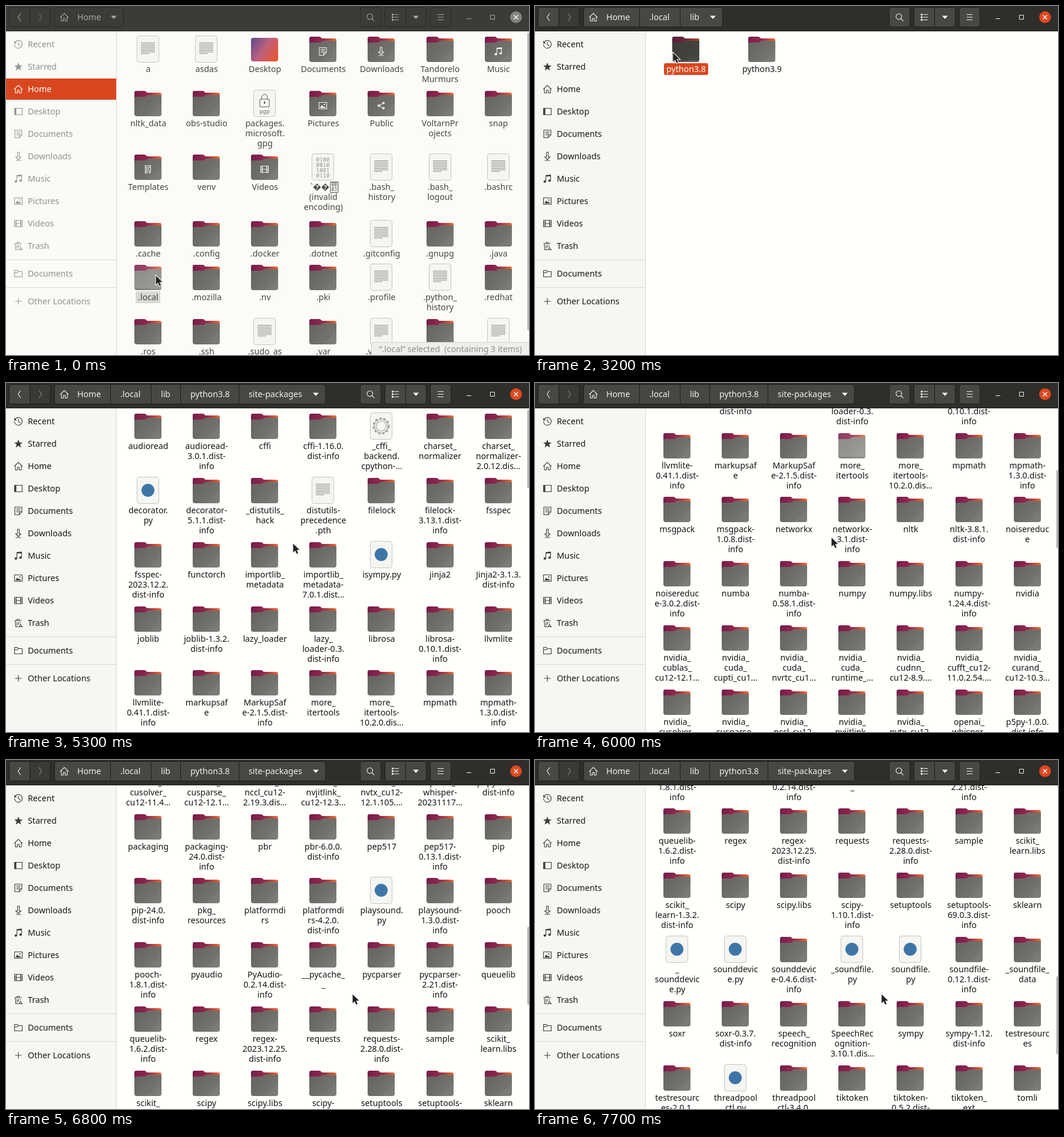
Recreate the animation shown at these times as an HTML page with a canvas. Size 888x592 px, loop 8 s.

```html
<!DOCTYPE html>
<html lang="en">
<head>
<meta charset="utf-8">
<title>File manager</title>
<style>
html, body { margin: 0; width: 888px; height: 592px; overflow: hidden; }
canvas { display: block; }
</style>
</head>
<body>
<canvas id="stage" width="888" height="592"></canvas>
<script>
const ctx = document.getElementById('stage').getContext('2d');
const LOOP = 8000, TICK = 100, NOTCH = 67.13;
const ORANGE = '#d9471f';
const FONT = '14.2px "Noto Sans", "Open Sans", sans-serif';

// 16px symbolic icons: [stroked path, filled path]
const ICONS = {
  Recent: ['M2.6 4.2A6.6 6.6 0 1 1 1.4 8M8 4v4.5l3.4 2', 'M1 2v4.5h4.5z'],
  Starred: ['', 'M8 1l2 5h5.2l-4.2 3.3 1.5 5.2L8 11.4 3.5 14.5 5 9.3.8 6H6z'],
  Home: ['M.8 8.6L8 1.5l7.2 7.1M3 7v7.5h3.5V10h3v4.5H13V7', ''],
  Desktop: ['M1.5 2.5h13v11h-13z', 'M1.5 2.5h3v11h-3z'],
  Documents: ['M2 1.5h12v8l-4.5 5H2zM4.5 4.5h7M4.5 7h7M4.5 9.5h4M9.5 14.5v-5H14', ''],
  Downloads: ['M6.5 1v8h-3L8 13.5 12.5 9h-3V1zM3.5 15h9', ''],
  Music: ['M5.5 12.5V2.5l8-1v9.5', 'M5 2h9v2H5zM1.5 12.8a2.2 2 0 1 1 4.4 0a2.2 2 0 1 1-4.4 0M9.5 11.3a2.2 2 0 1 1 4.4 0a2.2 2 0 1 1-4.4 0'],
  Pictures: ['M1.5 2.5h13v11h-13z', 'M3 12l3-5 2.5 3 1.5-1 3 3zM9.5 5h2v2h-2z'],
  Videos: ['M1.5 2.5h13v11h-13zM4.5 2.5v11M11.5 2.5v11M4.5 8h7M1.5 5.5h3M1.5 8h3M1.5 10.5h3M11.5 5.5h3M11.5 8h3M11.5 10.5h3', ''],
  Trash: ['M1.5 4h12M5.5 4V2h4v2M2.8 4l.8 10.5h5M6 6.5v6M8.5 6.5v4M11.5 6.5v2M9.5 14.5l2-4 3 4z', ''],
  Folder: ['M1.5 13.5v-11h5l1.5 2h6.5v9zM1.5 6.5h5l1.5-2', ''],
  Plus: ['M8 2.5v11M2.5 8h11', ''],
  Public: ['M12 3.5L4 8l8 4.5', 'M10 3.5a2 2 0 1 1 4 0a2 2 0 1 1-4 0M2 8a2 2 0 1 1 4 0a2 2 0 1 1-4 0M10 12.5a2 2 0 1 1 4 0a2 2 0 1 1-4 0'],
  Templates: ['M3.5 1.5h3v13h-3zM3.5 5h2M3.5 8h2M3.5 11h2M9.5 1.5h3v10l-1.5 3-1.5-3zM9.5 4.5h3', ''],
  Search: ['M2 7a4.8 4.8 0 1 1 9.6 0a4.8 4.8 0 1 1-9.6 0M10.3 10.5l4.2 4.2', ''],
  List: ['M6 3.5h8M6 8h8M6 12.5h8', 'M2 2h3v3H2zM2 6.5h3v3H2zM2 11h3v3H2z'],
  Menu: ['M3 3.5h10M3 8h10M3 12.5h10', ''],
  Back: ['M10 1.5L5.5 8l4.5 6.5', ''],
  Forward: ['M6 1.5L10.5 8L6 14.5', ''],
  Down: ['', 'M3 5.5h10L8 11z']
};
for (const key in ICONS) ICONS[key] = ICONS[key].map(d => new Path2D(d));

const SIDEBAR = 'Recent Starred Home Desktop Documents Downloads Music Pictures Videos Trash'.split(' ')
  .map((name, i) => [name, name, 65 + 38 * i])
  .concat([['Folder', 'Documents', 454], ['Plus', 'Other Locations', 501]]);

// Items are split by spaces, label lines by "/".
// Leading sign: = text, # script, * library, @ key, % binary.
const list = text => text.trim().split(/\s+/).map(item => {
  const kind = '=#*@%'.includes(item[0]) ? item[0] : '';
  return { kind, lines: item.slice(kind.length).split('/') };
});

const HOME = list(`
=a =asdas Desktop Documents Downloads Tandorelo/Murmurs Music
nltk_data obs-studio @packages./microsoft./gpg Pictures Public VoltarnPr/ojects snap
Templates venv Videos %\`\uFFFD\uFFFD/(invalid/encoding) =.bash_/history =.bash_/logout =.bashrc
.cache .config .docker .dotnet =.gitconfig .gnupg .java
.local .mozilla .nv .pki =.profile =.python_/history .redhat
.ros .ssh =.sudo_as .var =.viminfo .vscode =.wget-hsts`);

const PACKAGES = list(`
audioread audioread-/3.0.1.dist-/info cffi cffi-1.16.0./dist-info *_cffi_/backend./cpython-… charset_/normalizer charset_/normalizer-/2.0.12.dis…
#decorator./py decorator-/5.1.1.dist-/info _distutils_/hack =distutils-/precedence/.pth filelock filelock-/3.13.1.dist-/info fsspec
fsspec-/2023.12.2./dist-info functorch importlib_/metadata importlib_/metadata-/7.0.1.dist… #isympy.py jinja2 Jinja2-3.1.3./dist-info
joblib joblib-1.3.2./dist-info lazy_loader lazy_/loader-0.3./dist-info librosa librosa-/0.10.1.dist-/info llvmlite
llvmlite-/0.41.1.dist-/info markupsaf/e MarkupSaf/e-2.1.5.dist-/info more_/itertools more_/itertools-/10.2.0.dis… mpmath mpmath-/1.3.0.dist-/info
msgpack msgpack-/1.0.8.dist-/info networkx networkx-/3.1.dist-/info nltk nltk-3.8.1./dist-info noisereduc/e
noisereduc/e-3.0.2.dist-/info numba numba-/0.58.1.dist-/info numpy numpy.libs numpy-/1.24.4.dist-/info nvidia
nvidia_/cublas_/cu12-12.1… nvidia_/cuda_/cupti_cu1… nvidia_/cuda_/nvrtc_cu1… nvidia_/cuda_/runtime_… nvidia_/cudnn_/cu12-8.9.… nvidia_/cufft_cu12-/11.0.2.54.… nvidia_/curand_/cu12-10.3…
nvidia_/cusolver_/cu12-11.4… nvidia_/cusparse_/cu12-12.1… nvidia_/nccl_cu12-/2.19.3.dis… nvidia_/nvjitlink_/cu12-12.3… nvidia_/nvtx_cu12-/12.1.105.… openai_/whisper-/20231117… p5py-1.0.0./dist-info
packaging packaging-/24.0.dist-/info pbr pbr-6.0.0./dist-info pep517 pep517-/0.13.1.dist-/info pip
pip-24.0./dist-info pkg_/resources platformdi/rs platformdi/rs-4.2.0./dist-info #playsound./py playsound-/1.3.0.dist-/info pooch
pooch-/1.8.1.dist-/info pyaudio PyAudio-/0.2.14.dist-/info __pycache_/_ pycparser pycparser-/2.21.dist-/info queuelib
queuelib-/1.6.2.dist-/info regex regex-/2023.12.25./dist-info requests requests-/2.28.0.dist-/info sample scikit_/learn.libs
scikit_/learn-1.3.2./dist-info scipy scipy.libs scipy-/1.10.1.dist-/info setuptools setuptools-/69.0.3.dist-/info sklearn
#_/sounddevic/e.py #sounddevic/e.py sounddevic/e-0.4.6.dist-/info #_soundfile./py #soundfile./py soundfile-/0.12.1.dist-/info _soundfile_/data
soxr soxr-0.3.7./dist-info speech_/recognition SpeechRec/ognition-/3.10.1.dis… sympy sympy-1.12./dist-info testresourc/es
testresourc/es-2.0.1./dist-info #threadpool/ctl.py threadpool/ctl-3.4.0./dist-info tiktoken tiktoken-/0.5.2.dist-/info tiktoken_/ext tomli`);

const HOME_ROWS = [52, 144, 252, 365, 439, 531];
const flatRow = () => 52;
const VIEWS = [
  { start: 0, items: HOME, x: 241, gap: 99.1, rowY: r => HOME_ROWS[r], bar: 504 },
  { start: 800, items: list('bin lib share'), x: 249, gap: 117, rowY: flatRow },
  { start: 2100, items: list('python3.8 python3.9'), x: 256, gap: 129, rowY: flatRow },
  { start: 3400, items: list('site-/packages'), x: 256, gap: 129, rowY: flatRow },
  { start: 4900, items: PACKAGES, x: 241, gap: 99.1, rowY: r => 52.2 + 108.8 * r, bar: 132 }
];
const CRUMBS = [['Home', 83, 121, 161], ['.local', 178, 194, 230], ['lib', 247, 263, 280],
  ['python3.8', 297, 313, 379], ['site-packages', 396, 412, 504]];

// [from, to, view, item]
const HOVERS = [[0, 800, 0, 28], [1300, 2100, 1, 1], [3000, 3400, 2, 0], [4500, 4900, 3, 0], [5600, 6300, 4, 31]];
const SELECTED = [[0, 800, 0, 28], [1800, 2100, 1, 1], [3200, 3400, 2, 0], [4800, 4900, 3, 0]];
// [from, to, text]
const STATUS = [[0, 800, '“.local” selected  (containing 3 items)'],
  [1900, 2100, '“lib” selected  (containing 2 items)'],
  [3300, 3400, '“python3.8” selected  (containing 1 item)']];
// Moments of single wheel notches
const WHEEL = [5500, 5600, 5800, 5900, 5900, 6000, 6100, 6300, 6400, 6500, 6600, 6700, 6700, 6800,
  7300, 7400, 7600, 7600, 7700];
const POINTER = [[0, 254, 457], [800, 254, 457], [1300, 374, 91], [2000, 374, 91], [2400, 643, 250],
  [2500, 643, 250], [2700, 408, 149], [2900, 408, 149], [3000, 234, 79], [3300, 234, 79], [3900, 611, 334],
  [4100, 611, 334], [4500, 255, 75], [4800, 255, 75], [5300, 487, 272], [5400, 487, 272], [5600, 518, 285],
  [6000, 503, 262], [6200, 503, 262], [6800, 588, 397], [8000, 588, 397]];

const during = (spans, t) => spans.find(s => t >= s[0] && t < s[1]);

let focus = 0;
// Colour between the unfocused and the focused window
function tone(idle, active) {
  const part = (hex, i) => parseInt(hex.slice(i, i + 2), 16);
  return `rgb(${[1, 3, 5].map(i => Math.round(part(idle, i) + (part(active, i) - part(idle, i)) * focus))})`;
}

function rect(x, y, w, h, fill) {
  ctx.fillStyle = fill;
  ctx.fillRect(x, y, w, h);
}

function box(x, y, w, h, radius, fill, stroke) {
  ctx.beginPath();
  ctx.roundRect(x, y, w, h, radius);
  if (fill) { ctx.fillStyle = fill; ctx.fill(); }
  if (stroke) { ctx.strokeStyle = stroke; ctx.lineWidth = 1; ctx.stroke(); }
}

function text(str, x, middle, color, align = 'left', font = FONT) {
  ctx.font = font;
  ctx.textAlign = align;
  ctx.fillStyle = color;
  ctx.fillText(str, x, middle + 5);
}

function circle(x, y, r, fill) {
  ctx.beginPath();
  ctx.arc(x, y, r, 0, 7);
  ctx.fillStyle = fill;
  ctx.fill();
}

function icon(name, cx, cy, color) {
  const [line, solid] = ICONS[name];
  ctx.save();
  ctx.translate(cx - 8, cy - 8);
  ctx.strokeStyle = ctx.fillStyle = color;
  ctx.lineWidth = 1.1;
  ctx.stroke(line);
  ctx.fill(solid);
  ctx.restore();
}

function gradient(x0, y0, x1, y1, ...colors) {
  const g = ctx.createLinearGradient(x0, y0, x1, y1);
  colors.forEach((c, i) => g.addColorStop(i / (colors.length - 1), c));
  return g;
}

const FOLDER_BACK = new Path2D('M0 40V3Q0 0 3 0H17Q19 0 20 1.5L21.5 3H43Q46 3 46 6V40z');
const FOLDER_FRONT = new Path2D('M0 12Q0 10 2 10H17Q19 10 20.5 8.5L21 8Q22 7 24 7H44Q46 7 46 9V39Q46 43 42 43H4Q0 43 0 39z');
const SHEEN = new Path2D('M46 20V39Q46 43 42 43H22z');

function folder(name, shade) {
  if (name === 'Desktop') {
    box(0, 2, 46, 40, 4, gradient(0, 4, 46, 34, '#5d4a8c', '#bd617e', '#e8552f'));
    return;
  }
  ctx.fillStyle = gradient(0, 0, 46, 6, '#741d4c', '#94294b', '#ee6a32');
  ctx.fill(FOLDER_BACK);
  ctx.fillStyle = gradient(0, 8, 40, 43, '#63635f', '#797873');
  ctx.fill(FOLDER_FRONT);
  ctx.fillStyle = 'rgba(255,255,255,.03)';
  ctx.fill(SHEEN);
  if (ICONS[name]) icon(name, 23, 25, '#f2f2f0');
  if (shade) {
    ctx.fillStyle = shade;
    ctx.fill(FOLDER_BACK);
    ctx.fill(FOLDER_FRONT);
  }
}

function paper(kind) {
  box(4.5, -1.5, 37, 45, 4, '#f5f5f2', '#c4c4bf');
  if (kind === '=') {
    for (let i = 0; i < 8; i++) rect(11, 10 + i * 2.6, i === 7 ? 14 : 24, 1, '#8b8b87');
  } else if (kind === '#') {
    circle(23, 21, 11, '#3d76a6');
  } else if (kind === '*') {
    ctx.strokeStyle = '#a3a3a0';
    ctx.lineWidth = 3;
    ctx.setLineDash([4, 3.2]);
    ctx.beginPath(); ctx.arc(23, 21, 13, 0, 7); ctx.stroke();
    ctx.setLineDash([]);
    ctx.lineWidth = 1.2;
    for (const r of [11.5, 8.5]) { ctx.beginPath(); ctx.arc(23, 21, r, 0, 7); ctx.stroke(); }
  } else if (kind === '@') {
    box(15, 14, 16, 13, 1, null, '#555552');
    ctx.beginPath(); ctx.arc(23, 11, 5, Math.PI, 0); ctx.lineTo(28, 14); ctx.moveTo(18, 11); ctx.lineTo(18, 14);
    ctx.stroke();
    rect(22, 18, 2, 4, '#555552');
    text('pgp', 23, 33, '#666663', 'center', '9.5px "Noto Sans", sans-serif');
  } else {
    ['0100', '0010', '1001', '0110'].forEach((row, i) =>
      text(row, 23, 7 + 9 * i, '#92928e', 'center', '9.5px "Noto Sans Mono", monospace'));
  }
}

function drawItem(item, cx, top, hovered, selected) {
  ctx.save();
  ctx.translate(Math.round(cx) - 23, top);
  if (item.kind) paper(item.kind);
  else folder(item.lines[0], selected && focus ? `rgba(40,40,35,${.4 * focus})` : hovered && 'rgba(255,255,255,.14)');
  ctx.restore();

  let color = tone('#454542', '#141414');
  if (selected) {
    ctx.font = FONT;
    const w = Math.round(Math.max(...item.lines.map(l => ctx.measureText(l).width))) + 8;
    box(Math.round(cx - w / 2), top + 45, w, 3 + 17 * item.lines.length, 3, tone('#d8d8d5', ORANGE));
    color = tone('#454542', '#ffffff');
  }
  item.lines.forEach((line, i) => {
    const y = top + 55 + Math.round(17.2 * i);
    if (item.kind === '%' && i === 0) {
      text(line, cx + 11, y, color, 'right');
      box(cx + 12.5, y - 8.5, 13, 18, 0, null, color);
      ['00', '03'].forEach((hex, k) =>
        text(hex, cx + 19, y - 6 + 8 * k, color, 'center', '8px "Noto Sans Mono", monospace'));
    } else {
      text(line, cx + .5, y, color, 'center');
    }
  });
}

function drawContent(t, index) {
  const view = VIEWS[index];
  const scroll = WHEEL.filter(w => w <= t).length * NOTCH;
  const hover = during(HOVERS, t), chosen = during(SELECTED, t);
  const hits = (span, i) => !!span && span[2] === index && span[3] === i;

  rect(188, 43, 700, 549, tone('#fbfbf8', '#fffffc'));
  ctx.save();
  ctx.beginPath();
  ctx.rect(188, 43, 700, 549);
  ctx.clip();
  view.items.forEach((item, i) => {
    const top = Math.round(view.rowY(Math.floor(i / 7)) - scroll);
    if (top > -110 && top < 600) drawItem(item, view.x + view.gap * (i % 7), top, hits(hover, i), hits(chosen, i));
  });
  if (view.bar) box(885, Math.round(46 + scroll * .252), 4, view.bar, [2, 0, 0, 2], '#b9b9b6');

  const status = during(STATUS, t);
  if (status) {
    ctx.font = FONT;
    const left = Math.round(876 - ctx.measureText(status[2]).width);
    box(left - 12.5, 570.5, 290, 30, [4, 0, 0, 0], tone('#eeeeeb', '#f4f4f1'), '#d2d2cf');
    text(status[2], 876, 582, tone('#8c8c89', '#30302e'), 'right');
  }
  ctx.restore();
}

function drawSidebar(index) {
  rect(0, 43, 187, 549, tone('#fafaf7', '#f6f6f3'));
  rect(187, 43, 1, 549, '#d6d6d2');
  rect(0, 430, 187, 1, '#d9d9d5');
  rect(0, 477, 187, 1, '#d9d9d5');
  if (index === 0) rect(0, 123, 187, 36, ORANGE);
  for (const [name, label, y] of SIDEBAR) {
    const active = index === 0 && label === 'Home';
    icon(name, 21, y, active ? '#ffffff' : tone('#979794', '#3c3c3a'));
    text(label, 37, y, active ? '#ffffff' : tone('#90908d', '#161616'));
  }
}

function drawHeader(index) {
  const ink = tone('#a9a8a4', '#f0f0ed');
  const dim = tone('#6d6c68', '#8b8a86');
  const edge = tone('#282725', '#1f1e1c');
  const face = tone('#3c3b38', '#484744');
  const button = (x0, x1, radius, fill = face) => box(x0 - .5, 2.5, x1 - x0, 33, radius, fill, edge);

  rect(0, 0, 888, 43, tone('#3c3b38', '#2f2e2b'));
  rect(0, 42, 888, 1, tone('#2b2a28', '#1f1e1c'));
  button(6, 41, [4, 0, 0, 4]);
  button(41, 76, [0, 4, 4, 0], tone('#3c3b38', '#3a3936'));
  icon('Back', 23, 19, ink);
  icon('Forward', 58, 19, dim);

  for (let i = 0; i <= index; i++) {
    const [label, x, textX, textEnd] = CRUMBS[i], last = i === index;
    const end = last ? textEnd + 39 : CRUMBS[i + 1][1];
    button(x, end, [i ? 0 : 4, last ? 4 : 0, last ? 4 : 0, i ? 0 : 4]);
    text(label, textX, 19, ink);
    if (last) icon('Down', textEnd + 22, 19, ink);
  }
  icon('Home', 99, 19, ink);

  button(602, 637, 4);
  button(644, 679, [4, 0, 0, 4]);
  button(679, 714, [0, 4, 4, 0]);
  button(721, 756, 4);
  icon('Search', 619, 19, ink);
  icon('List', 661, 19, ink);
  icon('Down', 696, 19, ink);
  icon('Menu', 738, 19, ink);

  rect(782, 21, 8, 1, ink);
  box(822.5, 15.5, 7, 7, 0, null, ink);
  circle(866, 19, 10, tone('#858480', '#e0481f'));
  ctx.strokeStyle = '#fff';
  ctx.lineWidth = 1.4;
  ctx.stroke(new Path2D('M862.5 15.5l7 7M869.5 15.5l-7 7'));
}

const ARROW = new Path2D('M.5 .5V15.5L4 12.3 6.5 17.8 9 16.7 6.6 11.3H11.5z');

function drawPointer(t) {
  const next = POINTER.findIndex(p => p[0] > t);
  const [t0, x0, y0] = POINTER[next - 1], [t1, x1, y1] = POINTER[next];
  const k = (t - t0) / (t1 - t0);
  ctx.save();
  ctx.translate(Math.round(x0 + (x1 - x0) * k), Math.round(y0 + (y1 - y0) * k));
  ctx.lineWidth = 2;
  ctx.strokeStyle = '#fff';
  ctx.stroke(ARROW);
  ctx.fillStyle = '#222';
  ctx.fill(ARROW);
  ctx.restore();
}

function draw(now) {
  const t = Math.floor(now % LOOP / TICK) * TICK;
  const index = VIEWS.filter(v => v.start <= t).length - 1;
  focus = Math.min(1, Math.max(0, (t - 200) / 400));
  drawContent(t, index);
  drawSidebar(index);
  drawHeader(index);
  drawPointer(t);
  requestAnimationFrame(draw);
}
requestAnimationFrame(draw);
</script>
</body>
</html>
```
